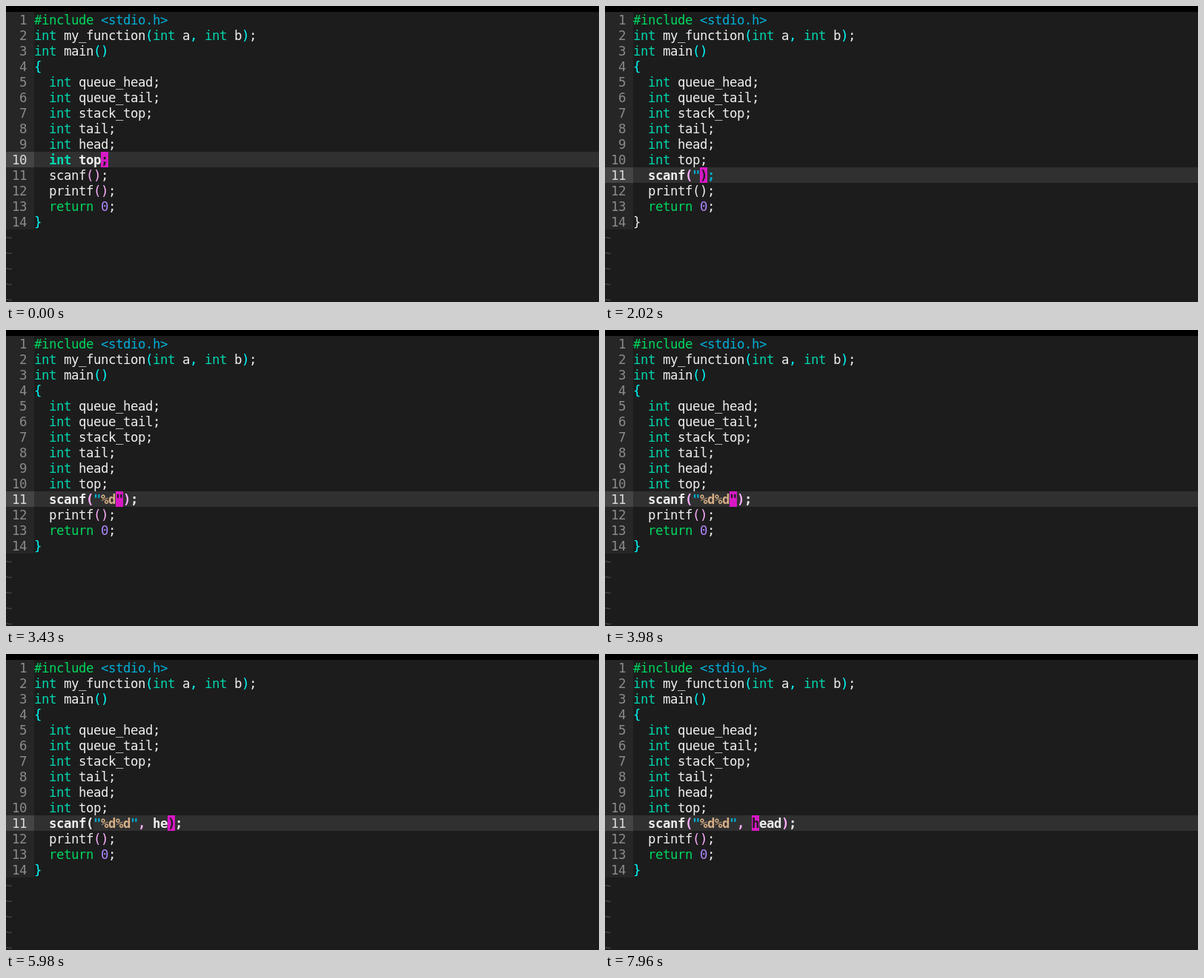
Recreate the animation shown at these times as an HTML page with a canvas. Size 800 px wide and 400 px high, loop 8 s.

```html
<!DOCTYPE html>
<html lang="en">
<head>
<meta charset="utf-8">
<title>Typing in an editor</title>
<style>
  html, body { margin: 0; width: 100%; height: 100%; overflow: hidden; background: #1c1c1c; }
  canvas { display: block; }
</style>
</head>
<body>
<canvas width="800" height="400"></canvas>
<script>
const ctx = document.querySelector('canvas').getContext('2d');
const LOOP = 8000, CELL = 10, ROW = 21, TOP = 8, LEFT = 38, ASCENT = 17;
const FONT = '17.33px "DejaVu Sans Mono", monospace';
const C = {
  back: '#1c1c1c', gutter: '#262626', line: '#303030', lineGutter: '#444444',
  number: '#8a8a8a', lineNumber: '#dadada', tilde: '#444444', text: '#eeeeee',
  type: '#00d7af', keyword: '#00d75f', string: '#00afd7', format: '#d7af87',
  digit: '#af87ff', cursor: '#d718c4', match: '#262626'
};
const RAINBOW = ['#00ffff', '#ffafff', C.text];
const TOKEN = /"[^"]*"?|#\w+|<.*>|\w+|./g;

// start time, row, cursor column, scanf arguments, bracket matched
const STEPS = [
  [0, 9, 9, ''],
  [650, 10, 9, ''],
  [920, 10, 8, ''],
  [970, 10, 8, '', true],
  [2020, 10, 9, '"'],
  [2180, 10, 10, '""', true],
  [2470, 10, 9, '""'],
  [3160, 10, 10, '"%"'],
  [3430, 10, 11, '"%d"'],
  [3780, 10, 12, '"%d%"'],
  [3980, 10, 13, '"%d%d"'],
  [4490, 10, 14, '"%d%d"', true],
  [4990, 10, 15, '"%d%d",', true],
  [5040, 10, 16, '"%d%d", ', true],
  [5500, 10, 17, '"%d%d", h', true],
  [5980, 10, 18, '"%d%d", he', true],
  [6210, 10, 19, '"%d%d", hea', true],
  [6250, 10, 20, '"%d%d", head', true],
  [6720, 10, 19, '"%d%d", head'],
  [6950, 10, 18, '"%d%d", head'],
  [7230, 10, 17, '"%d%d", head'],
  [7960, 10, 16, '"%d%d", head']
];

const program = args => `#include <stdio.h>
int my_function(int a, int b);
int main()
{
  int queue_head;
  int queue_tail;
  int stack_top;
  int tail;
  int head;
  int top;
  scanf(${args});
  printf();
  return 0;
}`.split('\n');

function box(color, x, y, w, h = ROW) {
  ctx.fillStyle = color;
  ctx.fillRect(x, y, w, h);
}

function print(text, x, y, color) {
  ctx.fillStyle = color;
  [...text].forEach((ch, i) => ctx.fillText(ch, x + i * CELL, y + ASCENT));
}

// The stack of open brackets carries over from line to line.
function tokenColor(token, open) {
  if (token === '(' || token === '{') return RAINBOW[(open.push(token) - 1) % 3];
  if (token === ')' || token === '}') {
    if (open[open.length - 1] !== (token === ')' ? '(' : '{')) return C.text;
    open.pop();
    return RAINBOW[open.length % 3];
  }
  if (token === ',' && open.length) return RAINBOW[(open.length - 1) % 3];
  if (token === 'int') return C.type;
  if (token === 'return' || token[0] === '#') return C.keyword;
  if (token[0] === '<' || token[0] === '"') return C.string;
  return /^\d/.test(token) ? C.digit : C.text;
}

function draw(time) {
  const [, row, col, args, matched] = STEPS.filter(s => s[0] <= time).pop();
  const open = [];
  box(C.back, 0, 0, 800, 400);
  box('#000000', 0, 0, 800, TOP);

  program(args).forEach((line, n) => {
    const y = TOP + n * ROW, current = n === row;
    box(current ? C.lineGutter : C.gutter, 0, y, LEFT);
    if (current) box(C.line, LEFT, y, 800 - LEFT);
    ctx.font = FONT;
    print(String(n + 1).padStart(2), 8, y, current ? C.lineNumber : C.number);

    if (current) ctx.font = 'bold ' + FONT;
    const matchCol = current && matched ? line.indexOf('(') : -1;
    if (matchCol >= 0) box(C.match, LEFT + matchCol * CELL, y, CELL);
    for (const { 0: token, index } of line.matchAll(TOKEN)) {
      const color = tokenColor(token, open);
      const parts = token[0] === '"' ? token.split(/(%d)/) : [token];
      let x = LEFT + index * CELL;
      for (const part of parts) {
        print(part, x, y, index === matchCol ? C.text : part === '%d' ? C.format : color);
        x += part.length * CELL;
      }
    }
    if (current) {
      box(C.cursor, LEFT + col * CELL, y, CELL);
      print(line[col], LEFT + col * CELL, y, C.back);
    }
  });

  ctx.font = FONT;
  for (let n = 14; n < 19; n++) print('~', -2, TOP + n * ROW, C.tilde);
}

const start = performance.now();
function tick() {
  draw((performance.now() - start) % LOOP);
  requestAnimationFrame(tick);
}
tick();
</script>
</body>
</html>
```
